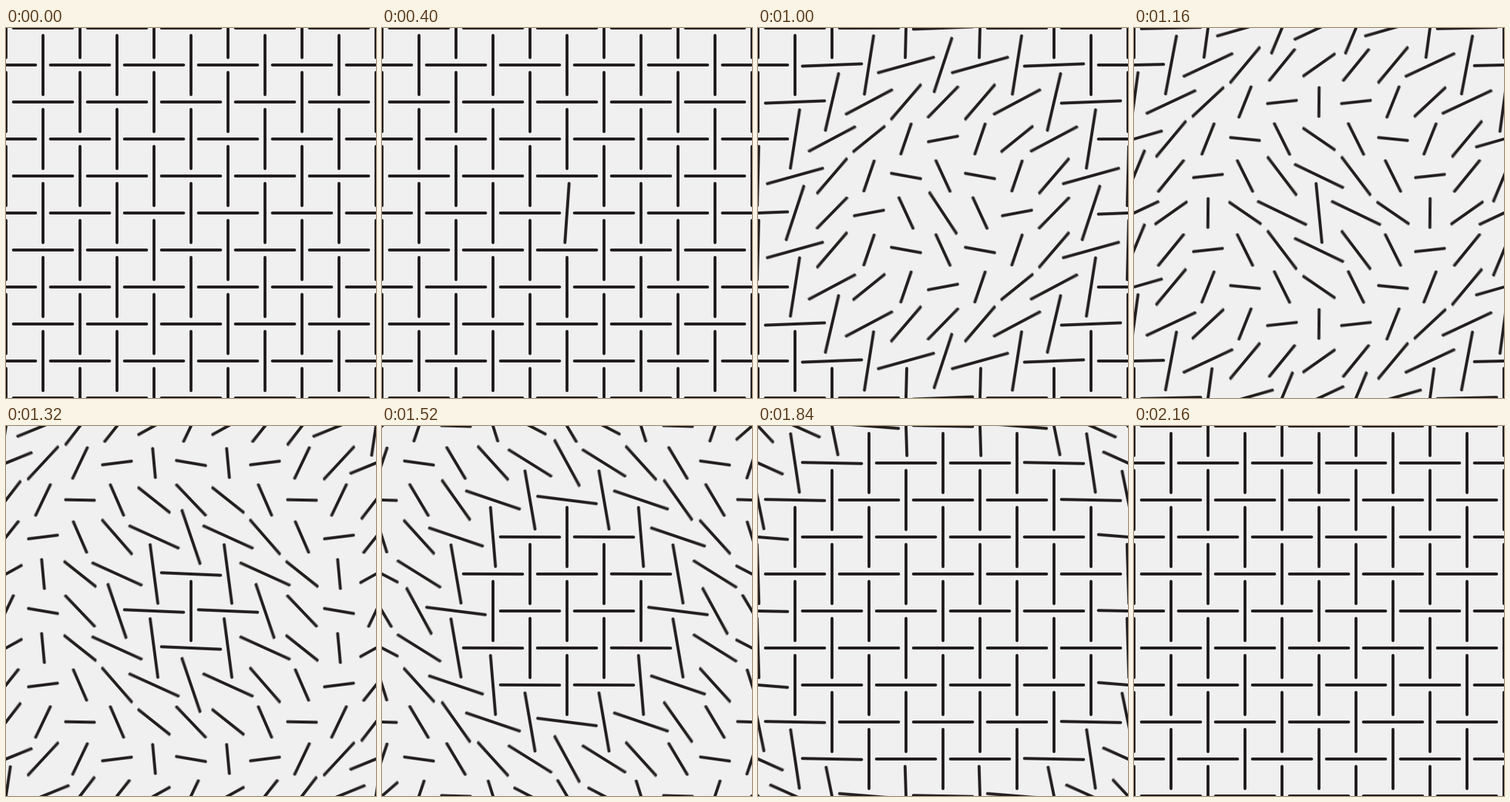
An HTML page with a canvas that plays this animation: 500x500 px, repeating every 2.24 s.

```html
<!DOCTYPE html>
<html lang="en">
<head>
<meta charset="utf-8">
<title>Rotating weave</title>
<style>
  html, body { margin: 0; width: 100%; height: 100%; overflow: hidden; background: #f0f0f0; }
  canvas { display: block; width: 500px; height: 500px; }
</style>
</head>
<body>
<canvas id="stage" width="500" height="500"></canvas>
<script>
const LOOP = 2240, STEP = 40;
const START = 316, TURN = 944, DELAY_PER_CELL = 124.5;
const CELL = 50, CELLS = 10, CENTER = CELLS / 2;
const LONG = 80, SHORT = 39;
const SHUTTER = [-8, -4, 0, 4, 8];

const ctx = document.getElementById('stage').getContext('2d');
const clamp = x => Math.min(1, Math.max(0, x));
const ease = x => x * x * (3 - 2 * x);

function drawBar(col, row, time) {
  const delay = DELAY_PER_CELL * Math.hypot(col - CENTER, row - CENTER);
  const u = clamp((time - START - delay) / TURN);
  const upright = (col + row) % 2 === 0;
  const turn = Math.PI * ease(u);
  const angle = upright ? turn - Math.PI / 2 : -turn;
  const shrink = ease(clamp((Math.min(u, 1 - u) - 0.125) / 0.375));
  const half = (LONG + (SHORT - LONG) * shrink) / 2;
  const dx = half * Math.cos(angle), dy = half * Math.sin(angle);
  const x = col * CELL, y = row * CELL;
  ctx.beginPath();
  ctx.moveTo(x - dx, y - dy);
  ctx.lineTo(x + dx, y + dy);
  ctx.stroke();
}

function draw(time) {
  ctx.clearRect(0, 0, 500, 500);
  ctx.strokeStyle = '#231f20';
  ctx.lineWidth = 4;
  ctx.lineCap = 'round';
  // Additive samples average to a short motion blur.
  ctx.globalCompositeOperation = 'lighter';
  ctx.globalAlpha = 1 / SHUTTER.length;
  for (const offset of SHUTTER)
    for (let row = 0; row <= CELLS; row++)
      for (let col = 0; col <= CELLS; col++)
        drawBar(col, row, time + offset);
}

const origin = performance.now();
function tick() {
  const elapsed = performance.now() - origin + 4;
  draw(Math.floor(elapsed % LOOP / STEP) * STEP);
  requestAnimationFrame(tick);
}
tick();
</script>
</body>
</html>
```
